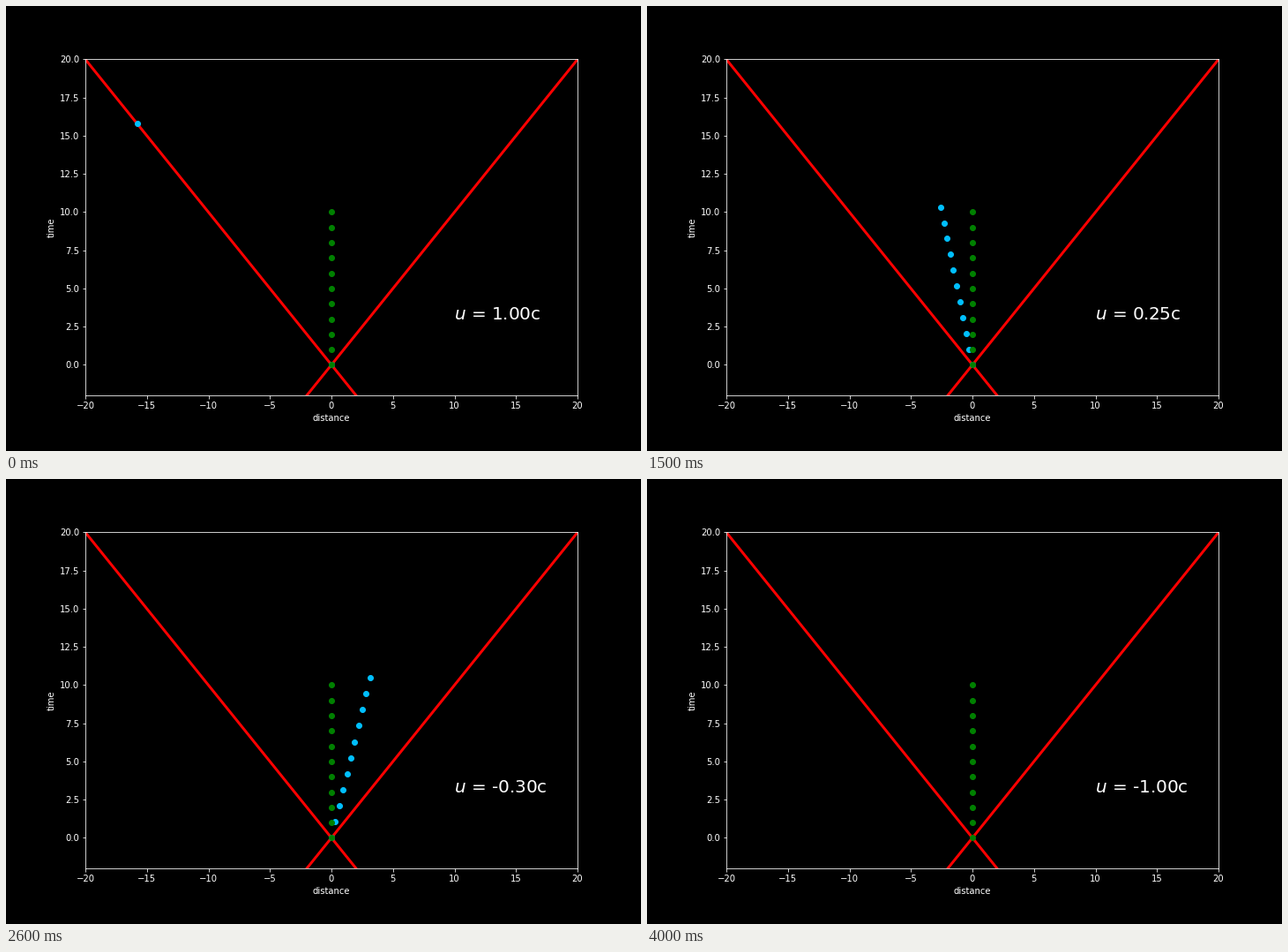
A matplotlib script for the animation above (4.1 s loop, 720 by 504 pixels).

```python
import numpy as np
import matplotlib.pyplot as plt
from matplotlib.animation import FuncAnimation

FRAMES = 41
TICKS = np.arange(11)

plt.style.use("dark_background")
plt.rcParams.update({
    "font.family": "DejaVu Sans",
    "font.size": 10,
    "mathtext.fontset": "dejavusans",
})

fig, ax = plt.subplots(figsize=(10, 7), dpi=72)
fig.subplots_adjust(left=0.125, right=0.9, bottom=0.125, top=0.88)
ax.set(xlim=(-20, 20), ylim=(-2, 20), xlabel="distance", ylabel="time")

# Light cone
for slope in (1, -1):
    ax.plot([-20, 20], [-20 * slope, 20 * slope], color="red", lw=3)

moving, = ax.plot([], [], "o", color="deepskyblue", ms=6)
ax.plot(0 * TICKS, TICKS, "o", color="green", ms=6)
label = ax.text(10, 3, "", fontsize=20)


def boosted(u):
    """Clock ticks of the resting observer seen from a frame moving at u."""
    if u <= -1:
        return [], []
    u = min(u, 0.998)  # keep the first boost finite
    gamma = 1 / np.sqrt(1 - u * u)
    return -gamma * u * TICKS, gamma * TICKS


def update(i):
    u = (20 - i) / 20
    moving.set_data(*boosted(u))
    label.set_text(f"$u$ = {u:.2f}c")
    return moving, label


anim = FuncAnimation(fig, update, frames=FRAMES, interval=100,
                     repeat=True, repeat_delay=0)
plt.show()
```
